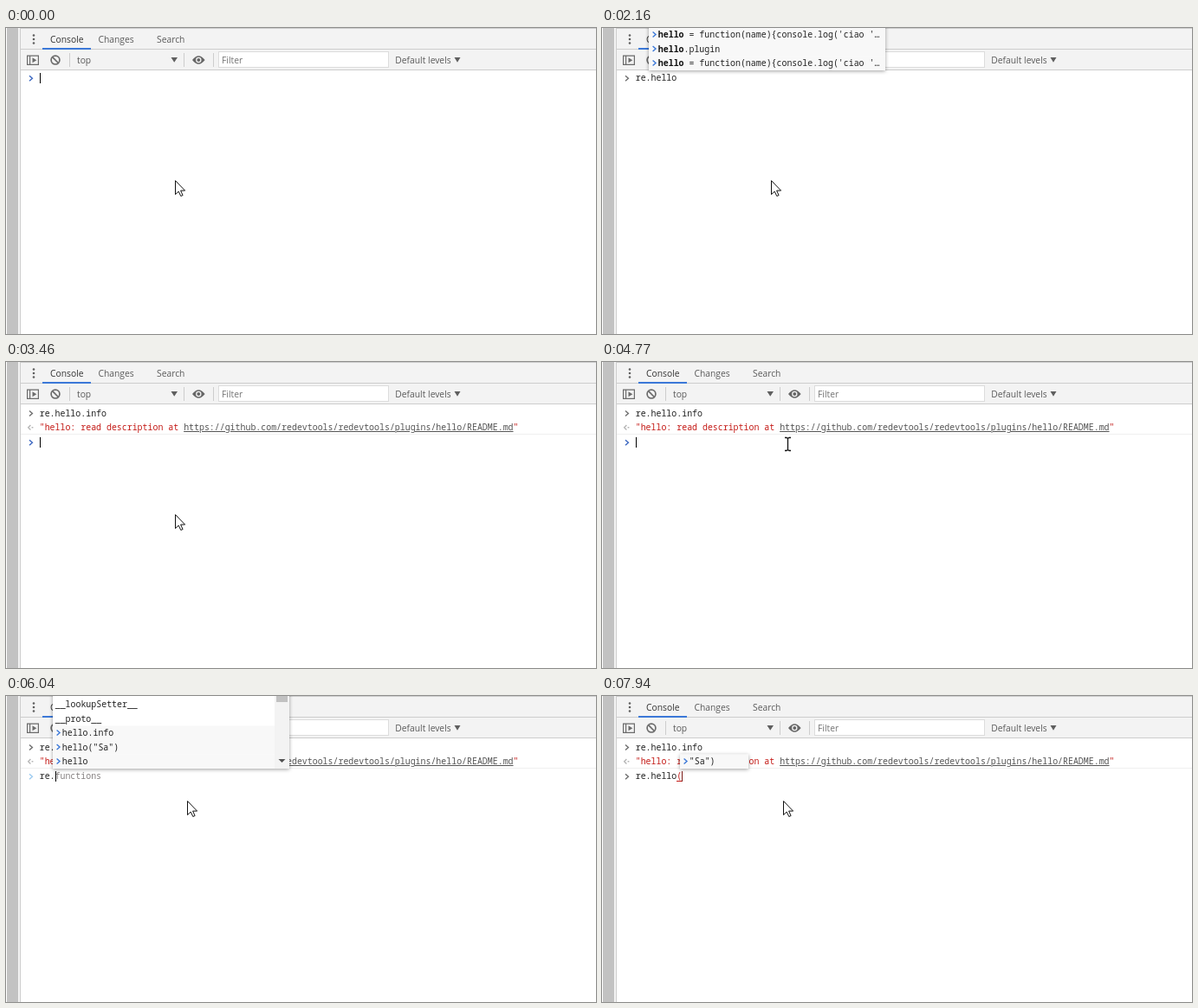
These frames come from a looping animation (681 px wide and 354 px high, 8000 ms). An HTML page:

```html
<!DOCTYPE html>
<html lang="en">
<head>
<meta charset="utf-8">
<title>Console autocomplete</title>
<style>
html, body { margin: 0; width: 100%; height: 100%; overflow: hidden; background: #fff; }
svg { display: block; width: 681px; height: 354px; }
text { white-space: pre; }
.ui { font: 10.3px "Open Sans", "Noto Sans", sans-serif; fill: #5a5a5a; }
.mono { font: 9.92px "Noto Sans Mono", "DejaVu Sans Mono", monospace; fill: #222; }
.mono .match { font-weight: 600; fill: #111; }
.mono .ghost { fill: #858080; }
.mono .string { fill: #c41a16; }
.mono .link { fill: #545454; text-decoration: underline; }
.line { fill: none; stroke-width: 1.4; }
.popup { filter: drop-shadow(0 1px 2px rgba(0, 0, 0, .38)); }
</style>
</head>
<body>
<svg viewBox="0 0 681 354">
  <rect width="681" height="354" fill="#fff"/>
  <rect x="1" width="13" height="354" fill="#c2c2c2"/>
  <rect x="14" width="2" height="354" fill="#f3f3f3"/>
  <rect x="17" width="664" height="48" fill="#f3f3f3"/>
  <path d="M16.5 0V354M17 .5H681M17 24.5H681M17 48.5H681" stroke="#cdcdcd" fill="none"/>
  <rect x="42" y="23" width="56" height="2" fill="#3b78d8"/>
  <g fill="#5f5f5f">
    <circle cx="32" cy="8.5" r="1.3"/><circle cx="32" cy="13" r="1.3"/><circle cx="32" cy="17.5" r="1.3"/>
  </g>
  <g class="ui">
    <text x="51" y="17" style="fill:#333">Console</text>
    <text x="106.5" y="17">Changes</text>
    <text x="174" y="17">Search</text>
    <text x="82" y="41">top</text>
    <text x="449.3" y="41">Default levels</text>
  </g>
  <path d="M73.5 29V45M205.5 29V45M239.5 29V45" stroke="#cdcdcd"/>
  <path d="M190.5 34H198L194.2 39.8ZM517.5 34H524.5L521 39.8Z" fill="#5f5f5f"/>
  <g fill="none" stroke="#6b6b6b" stroke-width="1.2">
    <path d="M24.6 32.1H37.4V42.4H24.6ZM27.6 32V42.5"/>
    <path d="M30.5 34.3L35.3 37.2 30.5 40.2Z" fill="#6b6b6b" stroke="none"/>
    <path d="M53.6 33.7L60.4 40.5" stroke-width="1.7"/>
    <circle cx="57" cy="37.1" r="4.9" stroke-width="1.7"/>
  </g>
  <path d="M215 37Q222.3 27.5 229.6 37Q222.3 46.5 215 37Z" fill="#666"/>
  <circle cx="222.3" cy="37" r="3.2" fill="#f3f3f3"/>
  <circle cx="222.3" cy="37" r="1.9" fill="#666"/>
  <rect x="245.5" y="27.5" width="196" height="18" fill="#fff" stroke="#dcdcdc"/>
  <text class="ui" x="249" y="41" style="fill:#757575">Filter</text>
  <g id="live"></g>
  <g id="pointer"></g>
</svg>
<script>
const LOOP = 8000, LEFT = 38.7, STEP = 5.95;
const BLUE = "#3a66c0", PALE = "#9ccbf0", GREY = "#6e6e6e";
const live = document.getElementById("live");
const pointer = document.getElementById("pointer");

// Popup rows; a leading ">" marks an entry from the history.
const FN = ">hello = function(name){console.log('ciao '…";
const GLOBALS = ["removeEventListener", "requestAnimationFrame"];
const commands = [...GLOBALS, '>re.hello("Sa")', ">re.hello.info", ">re.hello"];
const commands2 = [...GLOBALS, ">re.hello.info", '>re.hello("Sa")', ">re.hello"];
const members = ["__lookupSetter__", "__proto__", '>hello("Sa")', ">hello.info", ">hello"];
const members2 = ["__lookupGetter__", "__lookupSetter__", "__proto__", ">hello.info", '>hello("Sa")', ">hello"];
const hellos = [">hello.info", '>hello("Sa")', ">hello", FN, ">hello.plugin", FN];

const list = (rows, at, right, extra) => ({ rows, at, right, ...extra });
const wide = rows => list(rows, 0, 309, { bar: true });
const dots = (rows, thumb) => list(rows, 3, 327, { bar: true, thumb });
const matches = list(hellos, 3, 327);
const HELLO = "hello = function";
const rest = n => HELLO.slice(n);

// Each entry changes part of the state from its time on.
const events = [
  [0, { text: "", ghost: "", popup: null, icon: BLUE, caret: true, done: false }],
  [150, { text: "r" }],
  [230, { popup: wide(commands), ghost: 'e.hello("Sa")' }],
  [400, { text: "re", ghost: '.hello("Sa")' }],
  [700, { icon: GREY, ghost: "", caret: false }],
  [775, { text: "re.", popup: null, icon: PALE, caret: true }],
  [850, { popup: dots(members), ghost: "functions" }],
  [1160, { text: "re.h", popup: matches, ghost: rest(1), icon: BLUE }],
  [1390, { text: "re.he", ghost: rest(2) }],
  [1620, { text: "re.hel", ghost: rest(3) }],
  [1775, { text: "re.hell", ghost: rest(4) }],
  [1850, { text: "re.hello", ghost: rest(5) }],
  [1930, { ghost: "" }],
  [2160, { icon: GREY, caret: false }],
  [2230, { text: "re.hello.", popup: list(["valueOf", ">info", ">plugin"], 9, 210), ghost: "info", icon: PALE, caret: true }],
  [2550, { text: "re.hello.info", ghost: "", popup: null, icon: BLUE }],
  [2625, { icon: GREY, caret: false }],
  [2700, { text: "", icon: BLUE, caret: true, done: true }],
  [3060, { caret: false }],
  [3460, { caret: true }],
  [4010, { caret: false }],
  [4390, { caret: true }],
  [5190, { text: "r" }],
  [5270, { popup: wide(commands2), ghost: "e.hello.info" }],
  [5500, { text: "re", ghost: ".hello.info" }],
  [5970, { text: "re.", popup: null, ghost: "", icon: GREY }],
  [6040, { popup: dots(members2, true), ghost: "functions", icon: PALE }],
  [6360, { text: "re.h", ghost: "", icon: BLUE }],
  [6440, { popup: matches, ghost: rest(1) }],
  [6520, { text: "re.he", ghost: rest(2) }],
  [6820, { text: "re.hel", ghost: rest(3) }],
  [6970, { text: "re.hell", ghost: rest(4) }],
  [7140, { text: "re.hello", ghost: rest(5) }],
  [7220, { ghost: "" }],
  [7690, { caret: false }],
  [7940, { text: "re.hello(", popup: list(['>"Sa")'], 9, 169), icon: GREY, caret: true }]
];

const col = n => LEFT + n * STEP;
const span = (cls, s) => s ? `<tspan class="${cls}">${s}</tspan>` : "";
const mono = (x, y, s) => `<text class="mono" x="${x}" y="${y}">${s}</text>`;
const chevron = (x, y, color) =>
  `<path class="line" d="M${x} ${y - 3}l3.4 3-3.4 3" stroke="${color}"/>`;

function drawPopup({ rows, at, right, bar, thumb }, bottom, typed) {
  const left = Math.round(col(at) - 2.7);
  const top = Math.max(-10, bottom - rows.length * 16.5);
  const query = typed.slice(at);
  let out = `<rect class="popup" x="${left}" y="${top}" width="${right - left}" height="${bottom - top}" fill="#fff"/>`;
  rows.forEach((row, i) => {
    const y = bottom - (rows.length - 1 - i) * 16.5;
    const past = row[0] === ">";
    const label = past ? row.slice(1) : row;
    const n = label.startsWith(query) ? query.length : 0;
    if (y < 0) return;
    if (past) {
      out += `<rect x="${left}" y="${y - 16.5}" width="${right - left}" height="16.5" fill="#f8f8f8"/>`;
      out += chevron(left + 4.6, y - 8.5, "#3b78d8");
    }
    out += mono(left + (past ? 10.8 : 2.7), y - 5, span("match", label.slice(0, n)) + label.slice(n));
  });
  if (bar) {
    out += `<rect x="${right - 17}" y="${top}" width="17" height="${bottom - top}" fill="#f3f3f3"/>`;
    out += `<path d="M${right - 12.5} ${bottom - 11}h8l-4 4z" fill="#505050"/>`;
    if (thumb) out += `<rect x="${right - 15}" width="13" height="7" fill="#c1c1c1"/>`;
  }
  return out;
}

function drawResult() {
  const url = "https://github.com/redevtools/redevtools/plugins/hello/README.md";
  return chevron(27, 59.5, GREY) + mono(LEFT, 62.7, "re.hello.info") +
    `<path class="line" d="M28.4 73l-2.7 2.7 2.7 2.7M29.6 75.7h1.8" stroke="#b5b5b5"/>` +
    mono(LEFT, 79, span("string", '"hello: read description at ') + span("link", url) + span("string", '"')) +
    `<path d="M17 83.5H681" stroke="#f0f0f0"/>`;
}

function drawConsole(s) {
  const dy = s.done ? 35 : 0;
  const open = s.text.endsWith("(");
  const typed = open ? s.text.slice(0, -1) + span("string", "(") : s.text;
  const x = Math.round(col(s.text.length));
  let out = s.done ? drawResult() : "";
  out += chevron(27, 58.3 + dy, s.icon);
  out += mono(LEFT, 61.2 + dy, typed + span("ghost", s.ghost));
  if (open) out += `<path d="M${x - 6} ${63.5 + dy}h6" stroke="#c41a16"/>`;
  if (s.caret) out += `<rect x="${x}" y="${52 + dy}" width="1" height="12" fill="${open ? "#7a1a16" : "#000"}"/>`;
  if (s.popup) out += drawPopup(s.popup, 49 + dy, s.text);
  return out;
}

const arrow = (x, y) => `<path transform="translate(${x} ${y})" fill="#fff" stroke="#111"
  d="M.5.6V16.6L4.2 13.1 6.8 18.5 9.1 17.5 6.6 12.1H11.6Z"/>`;
const beam = (x, y) => `<path transform="translate(${x} ${y})" fill="none" stroke="#111" stroke-width="1.3"
  d="M-3-7.5H-1L.5-6.5 2-7.5H4M.5-6.5V6.5M-3 7.5H-1L.5 6.5 2 7.5H4"/>`;
const bend = (a, b, c, u) => Math.round(a * (1 - u) ** 2 + 2 * b * u * (1 - u) + c * u * u);

function drawPointer(t) {
  if (t >= 5020) return arrow(209, 121);
  if (t >= 4770) return beam(214, 95);
  const u = Math.max(0, Math.floor((t - 4390) / 76) / 5);
  return arrow(bend(195, 283, 214, u), bend(176, 132, 95, u));
}

let shown = -1, shape = "";
function render(t) {
  const now = events.filter(e => e[0] <= t);
  if (now.length !== shown) {
    shown = now.length;
    live.innerHTML = drawConsole(Object.assign({}, ...now.map(e => e[1])));
  }
  const next = drawPointer(t);
  if (next !== shape) pointer.innerHTML = shape = next;
}

const start = performance.now();
function tick() {
  render((performance.now() - start) % LOOP);
  requestAnimationFrame(tick);
}
tick();
</script>
</body>
</html>
```
